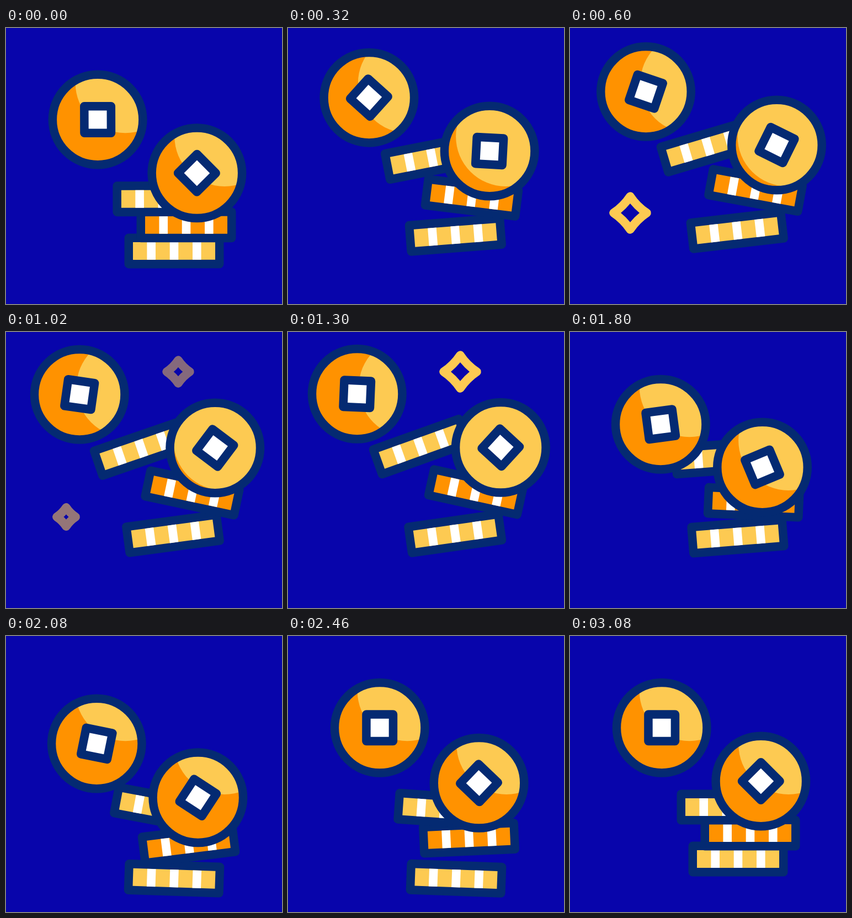
Animation of 500x500 px, one loop 3.1 s. Source, as an HTML page:

```html
<!DOCTYPE html>
<html lang="en">
<head>
<meta charset="utf-8">
<title>Coins</title>
<style>
  html, body { margin: 0; width: 100%; height: 100%; overflow: hidden; background: #0805ab; }
  svg { display: block; width: 100%; height: 100%; }
</style>
</head>
<body>
<svg id="stage" viewBox="0 0 500 500"></svg>
<script>
const LOOP = 3100;
const NAVY = '#042a72', ORANGE = '#ff9200', GOLD = '#fdca52', WHITE = '#fff';
const stage = document.getElementById('stage');

function add(parent, tag, attrs) {
  const node = document.createElementNS('http://www.w3.org/2000/svg', tag);
  for (const name in attrs) node.setAttribute(name, attrs[name]);
  return parent.appendChild(node);
}

const outline = { stroke: NAVY, 'stroke-width': 15.5, 'stroke-linejoin': 'round' };
const box = (w, h, fill) => ({ x: -w / 2, y: -h / 2, width: w, height: h, fill });

const clamp = u => Math.min(1, Math.max(0, u));
const mix = (a, b, u) => a + (b - a) * u;
// Cosine ease in and out between two times.
const ease = (t, from, to) => (1 - Math.cos(Math.PI * clamp((t - from) / (to - from)))) / 2;

// Launch, hover, swell to the peak, fall through to the dip, settle at rest.
const HOVER = 1080, DIP = 2020, REST = 2480;

function travel(t, lag, hover, peak, dip, power, fall, land) {
  const late = t - lag;
  const rise = 1 - (1 - clamp(t / HOVER)) ** power;
  const up = mix(hover * rise, peak, ease(t, HOVER, fall + lag));
  return mix(up, dip, ease(late, fall, land)) * (1 - ease(late, DIP, REST));
}

// Poses are offsets from rest: [dx, dy, rotation].
function offset(t, lag, { hover, peak, dip }) {
  const along = (i, ...timing) => travel(t, lag, hover[i], peak[i], dip[i], ...timing);
  return [along(0, 2.5, 1310, 1760), along(1, 4, 1470, DIP), along(2, 2.5, 1270, DIP)];
}

const coinPoses = { hover: [-33, -53, -82], peak: [-41, -54.5, -88], dip: [-2, 30, 12] };
const topPoses = { hover: [-38.5, -99, -19], peak: [-47, -109, -20], dip: [-2.5, 12, 12] };
const middlePoses = { hover: [11, -65.5, 12], peak: [15, -70, 12.5], dip: [4.5, 28, -8] };
const bottomPoses = { hover: [-2, -38.5, -7.6], peak: [-1.5, -40, -8.5], dip: [0, 59, 3.5] };

function makeChip(x, y, fill, poses, lag) {
  const group = add(stage, 'g');
  add(group, 'rect', { ...box(164.5, 47.5, fill), ...outline });
  for (const shift of [-41.3, 0, 41.3])
    add(group, 'rect', { ...box(15.6, 32, WHITE), x: shift - 7.8 });
  return t => {
    const [dx, dy, turn] = offset(t, lag, poses);
    group.setAttribute('transform', `translate(${x + dx} ${y + dy}) rotate(${turn})`);
  };
}

// The shine hardly moves while the coin slides underneath it.
function makeCoin(id, x, y, tilt, side, lag) {
  const clip = add(add(stage, 'clipPath', { id }), 'circle', { r: 76 });
  const disc = add(stage, 'circle', { r: 76, fill: ORANGE });
  const shine = add(add(stage, 'g', { 'clip-path': `url(#${id})` }), 'circle',
    { cy: y - 66.5, r: 90.5, fill: GOLD });
  const rim = add(stage, 'circle', { r: 81.75, fill: 'none', ...outline });
  const hole = add(stage, 'rect', { ...box(48.5, 48.5, WHITE), ...outline });
  return t => {
    const [dx, dy, turn] = offset(t, lag, coinPoses);
    const place = `translate(${x + side * dx} ${y + dy})`;
    for (const part of [clip, disc, rim]) part.setAttribute('transform', place);
    shine.setAttribute('cx', x + 50 - side * dx * .06);
    hole.setAttribute('transform', `${place} rotate(${tilt + side * turn})`);
  };
}

function makeStar(x, y, begin) {
  const path = add(stage, 'path', {
    fill: 'none', stroke: GOLD, 'stroke-width': 15.5, 'stroke-linejoin': 'round',
    transform: `translate(${x} ${y})`
  });
  return t => {
    const age = t - begin;
    const fade = 1 - ease(age, 470, 890);
    const size = ease(age, 0, 240) * fade;
    const a = 30 * size, b = 12 * size;
    path.setAttribute('d', `M0 ${-a}Q${b} ${-b} ${a} 0Q${b} ${b} 0 ${a}Q${-b} ${b} ${-a} 0Q${-b} ${-b} 0 ${-a}Z`);
    path.setAttribute('opacity', ease(age, 60, 240) * fade);
  };
}

const parts = [
  makeStar(109, 335, 360),
  makeStar(312, 72, 870),
  makeChip(304.5, 404, GOLD, bottomPoses, 240),
  makeChip(326.5, 357, ORANGE, middlePoses, 160),
  makeChip(283.5, 310, GOLD, topPoses, 160),
  makeCoin('left', 166.2, 166.2, 0, 1, 0),
  makeCoin('right', 345.8, 263, 45, -1, 80)
];

const start = performance.now();
function draw(now) {
  const t = Math.max(0, now - start) % LOOP;
  for (const update of parts) update(t);
  requestAnimationFrame(draw);
}
draw(start);
</script>
</body>
</html>
```
